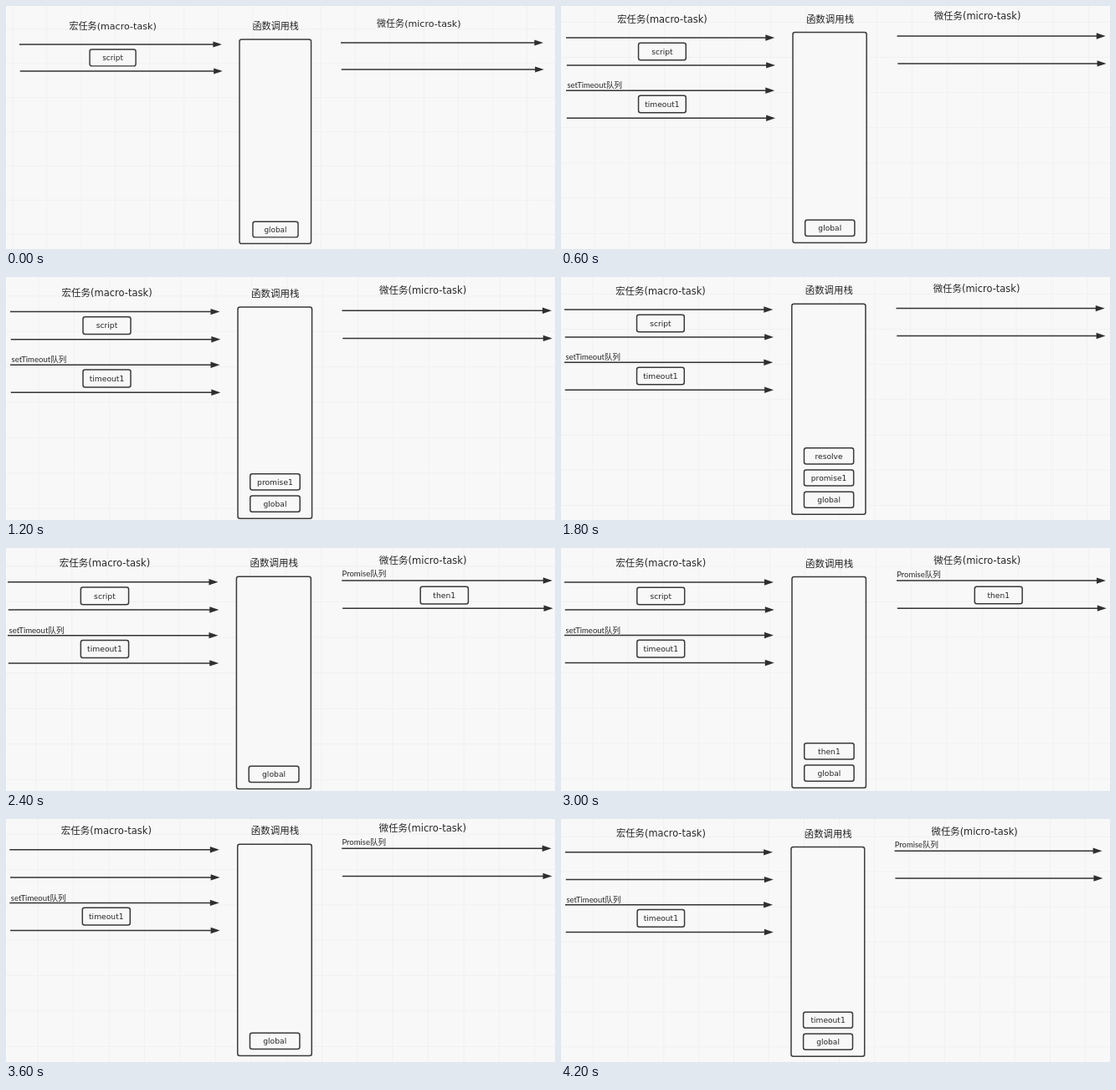
These frames come from a looping animation (656x291 px, 4800 ms). An HTML page:

```html
<!DOCTYPE html>
<html lang="zh-CN">
<head>
<meta charset="utf-8">
<title>Event loop</title>
<style>
  html, body { margin: 0; width: 100%; height: 100%; overflow: hidden; background: #f8f8f8; }
  svg { display: block; width: 656px; height: 291px; }
  text { fill: #262626; dominant-baseline: alphabetic; }
  .title { font: 11.5px "DejaVu Sans", "Noto Sans CJK SC", "Noto Sans CJK", sans-serif; }
  .task { font: 9.2px "DejaVu Sans", sans-serif; text-anchor: middle; }
  .label { font: 9.55px Lato, "Noto Sans CJK SC", "Noto Sans CJK", sans-serif; }
  .grid { stroke: #f1f1f1; fill: none; }
  .line { stroke: #333; stroke-width: 1.5; }
  .head { fill: #2f2f2f; }
  .box { fill: #f8f8f8; stroke: #3a3a3a; stroke-width: 1.5; }
  .scene { visibility: hidden; animation: show 4800ms step-end infinite; }
  @keyframes show {
    0% { visibility: visible; }
    12.5%, 100% { visibility: hidden; }
  }
</style>
</head>
<body>
<svg id="stage" viewBox="0 0 656 291"></svg>
<script>
const STEP = 600, PITCH = 42.4;

// s: zoom; macro, stack, micro: where each part starts
const scenes = [
  { s: .966, macro: [16, 46], stack: [279, 40], micro: [400, 44], script: 1, calls: [], slotW: 56 },
  { s: .995, macro: [6, 38], stack: [277, 31.5], micro: [401.5, 36], script: 1, timer: 1, calls: [] },
  { s: 1, macro: [5, 41.6], stack: [277, 36], micro: [401.5, 40.3], script: 1, timer: 1, calls: ['promise1'] },
  { s: .995, macro: [4, 39], stack: [275.8, 32.3], micro: [400.5, 37.6], script: 1, timer: 1, calls: ['promise1', 'resolve'] },
  { s: 1.004, macro: [2, 40.8], stack: [275.4, 34.3], micro: [401.3, 39], script: 1, timer: 1, jobs: 1, then: 1, calls: [] },
  { s: .998, macro: [4, 41], stack: [276, 34.5], micro: [401, 39.1], script: 1, timer: 1, jobs: 1, then: 1, calls: ['then1'] },
  { s: 1, macro: [4.3, 36.8], stack: [276.7, 30.3], micro: [401.2, 35.3], timer: 1, jobs: 1, calls: [] },
  { s: .99, macro: [5, 39.8], stack: [275, 33.5], micro: [398.6, 38.2], timer: 1, jobs: 1, calls: ['timeout1'] }
];

const text = (cls, x, y, str) => `<text class="${cls}" x="${x}" y="${y}">${str}</text>`;

const rect = (x, y, w, h, r) =>
  `<rect class="box" x="${x}" y="${y}" width="${w}" height="${h}" rx="${r}"/>`;

const task = (x, y, w, h, name) =>
  rect(x, y, w, h, 2.5) + text('task', x + w / 2, y + h / 2 + 3.4, name);

const arrow = (x, y) =>
  `<path class="line" d="M${x} ${y}h242"/>` +
  `<path class="head" d="M${x + 250.5} ${y}l-11-3.7v7.4z"/>`;

const queue = y => arrow(0, y) + arrow(.8, y + 33.1);

const part = ([x, y], s, body) => `<g transform="translate(${x} ${y}) scale(${s})">${body}</g>`;

function grid() {
  let d = '';
  for (let i = -1; i < 16; i++) d += `M${34 + i * PITCH}-60V310`;
  for (let i = -1; i < 7; i++) d += `M-40 ${23.6 + i * PITCH}H680`;
  return `<path class="grid" d="${d}"/>`;
}

function macro({ script, timer }) {
  let out = text('title', 61.5, -18.6, '宏任务(macro-task)') + queue(0);
  if (script) out += task(87, 6.2, 57, 20.6, 'script');
  if (timer) {
    out += queue(63.6) + text('label', 1.5, 60.8, 'setTimeout队列') +
      task(87, 69.5, 57, 20.8, 'timeout1');
  }
  return out;
}

function stack({ calls, slotW = 59.5 }) {
  const slots = ['global', ...calls].map((name, i) =>
    task(44.5 - slotW / 2, 226 - i * 26.3, slotW, 19.2, name));
  return text('title', 16, -12, '函数调用栈') + rect(0, 0, 88.6, 253.2, 2.5) + slots.join('');
}

function micro({ jobs, then }) {
  let out = text('title', 44.4, -19.9, '微任务(micro-task)') + queue(0);
  if (jobs) out += text('label', .2, -4.6, 'Promise队列');
  if (then) out += task(93.5, 7.2, 57, 20.6, 'then1');
  return out;
}

const delay = i => (i ? i - scenes.length : 0) * STEP;

// A negative delay puts each scene in its own slot of the loop
document.getElementById('stage').innerHTML = scenes.map((c, i) =>
  `<g class="scene" style="animation-delay:${delay(i)}ms">` +
  part(c.macro, c.s, grid() + macro(c)) +
  part(c.stack, c.s, stack(c)) +
  part(c.micro, c.s, micro(c)) + '</g>').join('');
</script>
</body>
</html>
```
